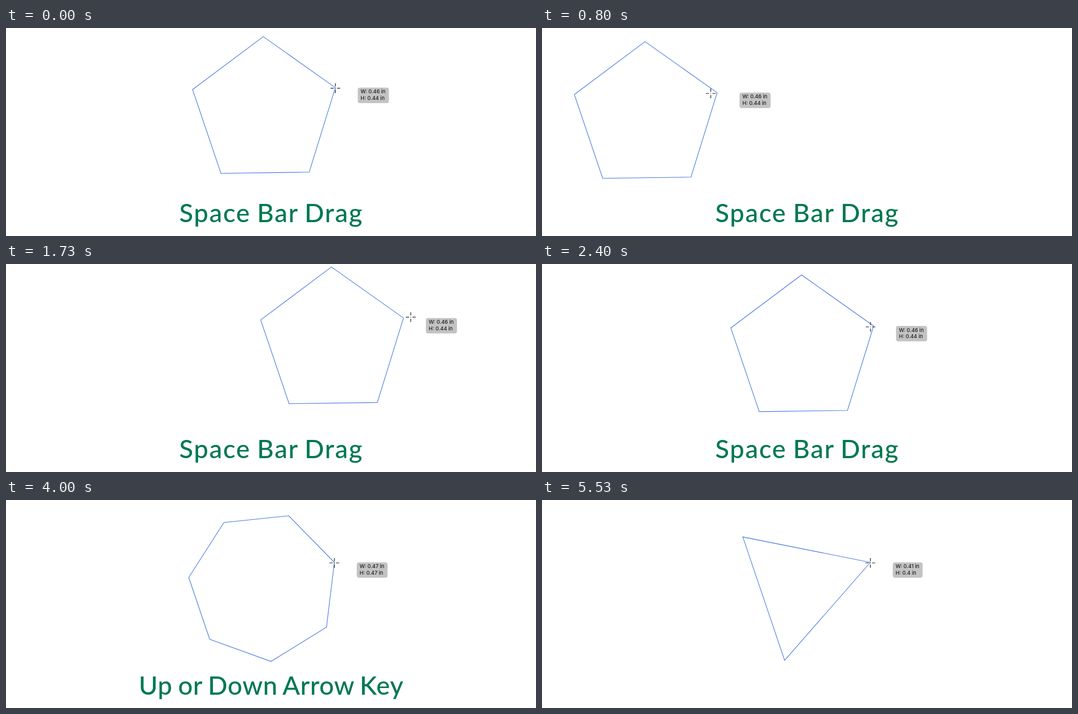
An HTML page that plays this animation: 960x376 px, repeating every 5670 ms.

```html
<!DOCTYPE html>
<html lang="en">
<head>
<meta charset="utf-8">
<title>Polygon tool keys</title>
<style>
  html, body { margin: 0; width: 100%; height: 100%; overflow: hidden; background: #fff; }
  svg { display: block; width: 960px; height: 376px; }
  #shape { fill: none; stroke: #4678de; stroke-width: 1.1; }
  #cursor { fill: none; stroke: #1c1c1c; stroke-width: 1.2; }
  #tip rect { fill: #c3c3c3; }
  #tip text { font: 500 9.3px Inter, "Open Sans", sans-serif; fill: #1d1d1d; }
  .title {
    font: 500 46.5px Lato, "Open Sans", sans-serif;
    fill: #007950; text-anchor: middle; word-spacing: -2px;
  }
  #drag { letter-spacing: 1.8px; }
  #arrow { letter-spacing: .6px; }
</style>
</head>
<body>
<svg viewBox="0 0 960 376">
  <polygon id="shape"/>
  <g id="tip">
    <rect height="27.8" rx="4"/>
    <text id="w" x="5.2" y="10.6"></text>
    <text id="h" x="5.2" y="21.9"></text>
  </g>
  <path id="cursor" d="M-8.8 0H-3M3 0H8.8M0 -8.8V-3M0 3V8.8M-.6 0H.6"/>
  <text id="drag" class="title" x="480.4" y="350.5">Space Bar Drag</text>
  <text id="arrow" class="title" x="480.3" y="351.5">Up or Down Arrow Key</text>
</svg>
<script>
const LOOP = 5670, TICK = 200 / 3;
const RADIUS = 136, ANGLE = -18.76 * Math.PI / 180, PX_PER_INCH = 562;

// each drag eases from one tick to another and ends at x, y
const origin = { x: 467.8, y: 151.6 };
const drags = [
  { from: 2.5, to: 13.35, x: 176, y: 161 },
  { from: 16.54, to: 19.77, x: 521, y: 155.4 },
  { from: 22.5, to: 27.2, x: 604.8, y: 138.7 },
  { from: 27.2, to: 37.25, x: 466, y: 156.5 }
];

// tick at which the number of sides changes
const sideSteps = [[0, 5], [57, 6], [60, 7], [66, 6], [69, 5], [72, 4], [78, 3]];

const $ = id => document.getElementById(id);
const shape = $("shape"), tip = $("tip"), box = tip.querySelector("rect");
const show = (el, on) => el.setAttribute("visibility", on ? "visible" : "hidden");
const move = (el, x, y) => el.setAttribute("transform", `translate(${x.toFixed(2)} ${y.toFixed(2)})`);

function ease(u) {
  u = Math.min(Math.max(u, 0), 1);
  return u * u * (3 - 2 * u);
}

function centre(tick) {
  return drags.reduce((p, d) => {
    const e = ease((tick - d.from) / (d.to - d.from));
    return { x: p.x + (d.x - p.x) * e, y: p.y + (d.y - p.y) * e };
  }, origin);
}

function corners(n) {
  return Array.from({ length: n }, (_, i) => {
    const a = ANGLE + i * 2 * Math.PI / n;
    return { x: RADIUS * Math.cos(a), y: RADIUS * Math.sin(a) };
  });
}

function inches(values) {
  const span = Math.max(...values) - Math.min(...values);
  return Math.round(span / PX_PER_INCH * 100) / 100;
}

function draw(ms) {
  const tick = Math.floor((ms % LOOP + 4) / TICK);
  const c = centre(tick), pointer = centre(tick + 1);
  const sides = sideSteps.filter(s => s[0] <= tick).pop()[1];
  const pts = corners(sides), grip = pts[0];

  shape.setAttribute("points", pts.map(p =>
    `${(c.x + p.x).toFixed(2)},${(c.y + p.y).toFixed(2)}`).join(" "));

  $("w").textContent = `W: ${inches(pts.map(p => p.x))} in`;
  $("h").textContent = `H: ${inches(pts.map(p => p.y))} in`;
  box.setAttribute("width", $("w").getComputedTextLength() + 11.2);
  move(tip, c.x + grip.x + 40.6, c.y + grip.y);

  // the pointer runs one tick ahead of the outline
  move($("cursor"), pointer.x + grip.x, pointer.y + grip.y + 1);

  show($("drag"), tick < 41);
  show($("arrow"), tick >= 52 && tick < 83);
}

const start = performance.now();
function loop() {
  draw(performance.now() - start);
  requestAnimationFrame(loop);
}
loop();
</script>
</body>
</html>
```
